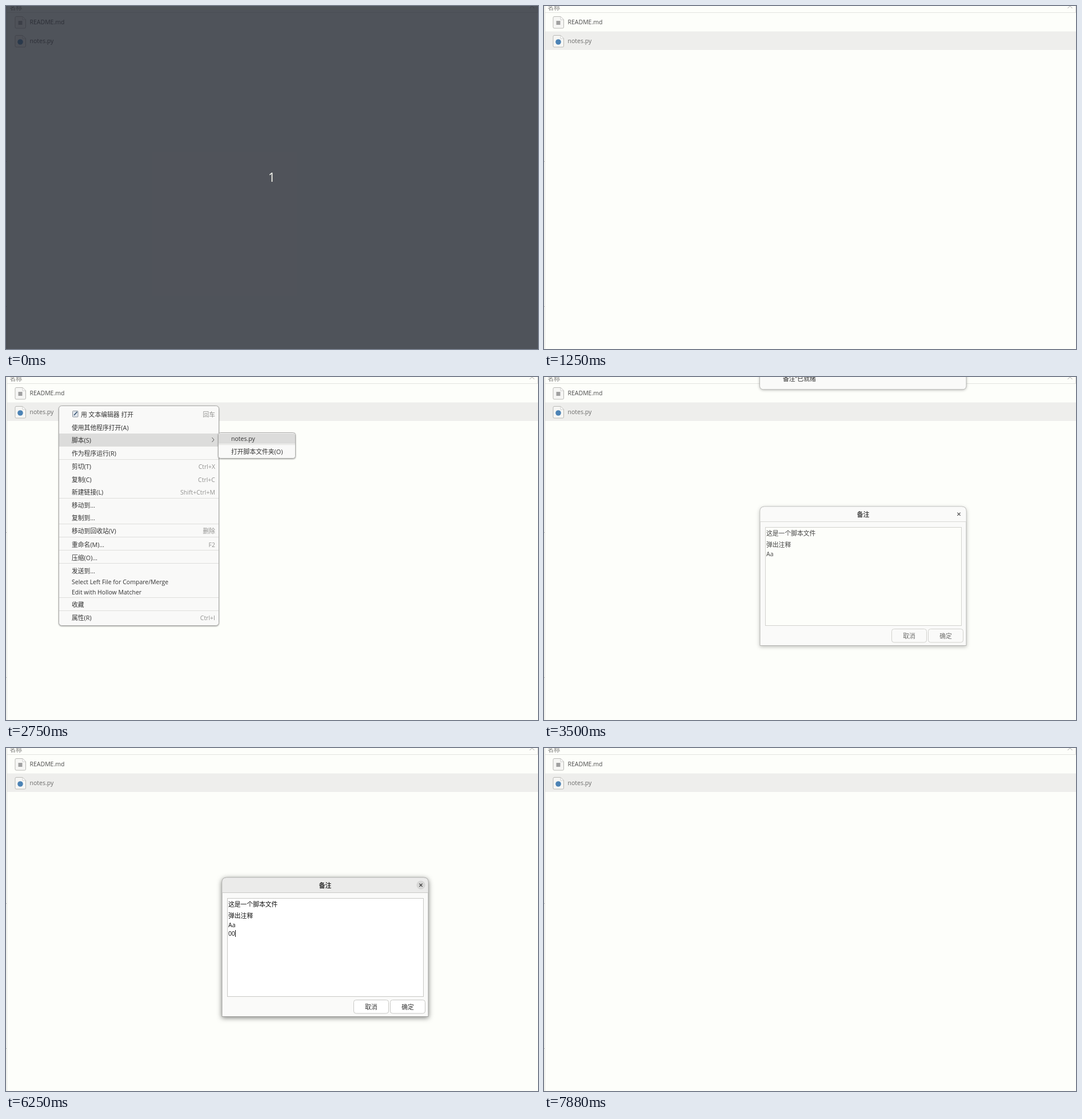
An HTML page that plays this animation: 931x601 px, repeating every 8 s.

```html
<!DOCTYPE html>
<html lang="zh-CN">
<head>
<meta charset="utf-8">
<title>notes</title>
<style>
  html, body { margin: 0; width: 100%; height: 100%; overflow: hidden; background: #fdfefa; }
  svg { display: block; }
  text { font-family: "Open Sans", "Noto Sans CJK SC", "Noto Sans CJK", sans-serif; white-space: pre; }
</style>
</head>
<body>
<script>
const LOOP = 8000;
const NS = 'http://www.w3.org/2000/svg';

function add(parent, tag, attrs = {}) {
  const el = document.createElementNS(NS, tag);
  for (const key in attrs) el.setAttribute(key, attrs[key]);
  parent.appendChild(el);
  return el;
}
const group = (parent, attrs) => add(parent, 'g', attrs);
const rect = (parent, x, y, width, height, fill, more) =>
  add(parent, 'rect', { x, y, width, height, fill, ...more });
const path = (parent, d, stroke, more) =>
  add(parent, 'path', { d, stroke, fill: 'none', ...more });

// Chinese labels are set slightly larger than Latin ones.
function label(parent, str, x, y, fill, more) {
  const size = /[\u4e00-\u9fff]/.test(str) ? 10.8 : 10.5;
  const el = add(parent, 'text', { x, y, fill, 'font-size': size, ...more });
  el.textContent = str;
  return el;
}

// Holds each value until the time of the next one.
function hold(el, prop, table) {
  const frames = table.map(([ms, value]) => ({ offset: ms / LOOP, [prop]: value, easing: 'step-end' }));
  frames.push({ offset: 1, [prop]: table[table.length - 1][1] });
  el.animate(frames, { duration: LOOP, iterations: Infinity });
}
const show = (el, from, to = LOOP) =>
  hold(el, 'opacity', [[0, 0], [from, 1], ...(to < LOOP ? [[to, 0]] : [])]);

const stage = add(document.body, 'svg', { width: 931, height: 601, viewBox: '0 0 931 601' });

function fileIcon(y) {
  path(stage, `M18 ${y}H29L34.5 ${y + 5.5}V${y + 18.5}q0 2 -2 2H18q-2 0 -2 -2V${y + 2}q0 -2 2 -2Z`, '#b9b9b5', { fill: '#f6f6f4' });
  path(stage, `M29 ${y}V${y + 5.5}H34.5Z`, '#c6c6c2', { fill: '#fff', 'stroke-width': .8 });
}

function fileList() {
  rect(stage, 0, 0, 931, 601, '#fdfefa');
  rect(stage, 1, 0, 1, 601, '#dededa');
  rect(stage, 2, 11, 929, 1, '#e3e3df');
  rect(stage, 930, 0, 1, 11, '#dededa');
  for (const y of [272, 526]) rect(stage, 0, y, 1, 1, '#aaa');
  label(stage, '名称', 6.5, 7, '#a3a3a0', { 'font-weight': 700 });
  path(stage, 'M916.5 4L920.5 0L924.5 4', '#a8a8a5');

  const row = rect(stage, 2, 44.5, 929, 32.5, '#eeeeec');
  show(row, 1250);
  fileIcon(18.5);
  rect(stage, 21.5, 26, 7, 7, '#a0a0a0');
  label(stage, 'README.md', 41.5, 32, '#4c4c4c');
  fileIcon(51.5);
  add(stage, 'circle', { cx: 25, cy: 63, r: 4.8, fill: '#4c83b5' });
  const name = label(stage, 'notes.py', 41.5, 65, '#4c4c4c');
  hold(name, 'fill', [[0, '#4c4c4c'], [1250, '#6a6a69']]);
}

function menuBox(parent, x, y, w, h, r) {
  rect(parent, x, y, w, h, '#f9f9f8', {
    rx: r, stroke: '#a9a9a7', style: 'filter:drop-shadow(0 1px 1.2px rgba(0,0,0,.35))'
  });
}

function contextMenu() {
  const menu = group(stage);
  show(menu, 1750, 3130);
  menuBox(menu, 92.5, 50.5, 280, 385, 5);
  const hover = rect(menu, 93, 55, 279, 22, '#dcdcdb');
  show(hover, 1880);
  hold(hover, 'transform', [[0, 'translateY(0px)'], [2000, 'translateY(22px)'], [2130, 'translateY(44px)']]);

  for (const y of [121, 144, 212, 257, 280, 303, 326, 386, 409]) rect(menu, 93, y, 279, 1, '#dededc');
  const items = [
    ['用 文本编辑器 打开', 66, '回车'], ['使用其他程序打开(A)', 88.5], ['脚本(S)', 111],
    ['作为程序运行(R)', 134], ['剪切(T)', 157, 'Ctrl+X'], ['复制(C)', 179.5, 'Ctrl+C'],
    ['新建链接(L)', 202, 'Shift+Ctrl+M'], ['移动到…', 225], ['复制到…', 247],
    ['移动到回收站(V)', 270, '删除'], ['重命名(M)…', 293.5, 'F2'], ['压缩(O)…', 316.5],
    ['发送到…', 339.5], ['Select Left File for Compare/Merge', 359], ['Edit with Hollow Matcher', 377],
    ['收藏', 399], ['属性(R)', 422, 'Ctrl+I']
  ];
  items.forEach(([str, y, key], i) => {
    label(menu, str, i ? 115 : 131, y + 4, '#333');
    if (key) label(menu, key, 366, y + 4, '#929290', { 'text-anchor': 'end' });
  });
  rect(menu, 116.5, 59.5, 9.5, 10.5, '#dfe5ec', { rx: 1, stroke: '#8d949c' });
  path(menu, 'M119 67L124.5 61', '#34506e', { 'stroke-width': 1.7 });
  path(menu, 'M360.5 106L364 110L360.5 114', '#555');

  const sub = group(menu);
  show(sub, 2380);
  menuBox(sub, 371.5, 97.5, 135, 45, 4);
  show(rect(sub, 372, 99, 134, 18, '#dcdcdb'), 2750);
  rect(sub, 372, 118, 134, 1, '#dededc');
  label(sub, 'notes.py', 394, 112, '#333');
  label(sub, '打开脚本文件夹(O)', 394, 134.5, '#333');
}

const FOCUSED = {
  head: '#ebebea', line: '#c9c9c7', title: '#2e2e2e', area: '#fff', text: '#111',
  button: '#fff', caption: '#333', edge: '#a3a3a1', frame: '#c8c8c5',
  shadow: 'drop-shadow(0 2.5px 4.5px rgba(0,0,0,.5))'
};
const BACKDROP = {
  head: '#fafaf9', line: '#d8d8d5', title: '#484848', area: '#fdfefa', text: '#454545',
  button: '#fafaf9', caption: '#6c6c6a', edge: '#b5b5b2', frame: '#d2d2ce',
  shadow: 'drop-shadow(0 2px 3px rgba(0,0,0,.25))'
};

function dialog(look) {
  const box = group(stage);
  const middle = { 'text-anchor': 'middle' };
  path(box, 'M378 470.5V235q0 -8 8 -8H731q8 0 8 8V470.5Z', look.edge,
    { fill: '#fafaf9', style: `filter:${look.shadow}` });
  path(box, 'M378.5 253V235q0 -7.5 7.5 -7.5H731q7.5 0 7.5 7.5V253Z', 'none', { fill: look.head });
  rect(box, 378.5, 253, 360, 1, look.line);
  label(box, '备注', 558.5, 245.3, look.title, { ...middle, 'font-weight': 700 });
  if (look === FOCUSED) add(box, 'circle', { cx: 726, cy: 240.2, r: 7.6, fill: '#d7d7d6' });
  path(box, 'M723.4 237.6l5.2 5.2m0 -5.2l-5.2 5.2', look.title, { 'stroke-width': 1.2 });
  rect(box, 387.5, 263.5, 343, 172, look.area, { stroke: look.frame });
  [['这是一个脚本文件', 278], ['弹出注释', 297.5], ['Aa', 314]]
    .forEach(([str, y]) => label(box, str, 389, y, look.text));
  const buttons = [['取消', 608.5], ['确定', 672.5]].map(([str, x]) => {
    const face = rect(box, x, 441.5, 61, 23.5, look.button, { rx: 4, stroke: look.frame });
    label(box, str, x + 30.5, 457.5, look.caption, middle);
    return face;
  });
  return { box, ok: buttons[1] };
}

function dialogs() {
  const typed = [6000, 6250, 6380];
  const advance = 5.8;
  const typeZeros = (box, fill) => typed.forEach((ms, i) =>
    show(label(box, '0', 389 + i * advance, 329, fill), ms));

  const idle = dialog(BACKDROP);
  typeZeros(idle.box, BACKDROP.text);
  idle.box.style.transformOrigin = '558.5px 348.5px';
  hold(idle.box, 'opacity', [[0, 0], [3250, .5], [3500, 1], [4380, 0], [7630, 1], [7880, 0]]);
  hold(idle.box, 'transform', [[0, 'scaleY(.5)'], [3500, 'scaleY(1)']]);

  const active = dialog(FOCUSED);
  typeZeros(active.box, FOCUSED.text);
  hold(active.box, 'opacity', [[0, 0], [4250, .5], [4380, 1], [7630, 0]]);
  hold(active.ok, 'fill', [[0, '#fff'], [7380, '#f6f6f5'], [7500, '#d9d9d7']]);

  const caret = rect(active.box, 389, 319, 1, 12, '#111');
  hold(caret, 'opacity', [[0, 0], [4250, 1], [4630, 0], [5000, 1], [5880, 0], [6000, 1]]);
  hold(caret, 'transform', [[0, 'translateX(0px)'],
    ...typed.map((ms, i) => [ms, `translateX(${Math.round((i + 1) * advance)}px)`])]);
}

function notification() {
  const note = group(stage);
  rect(note, 377.5, -40, 361.5, 61.8, '#fafaf9', {
    rx: 6, stroke: '#b9b9b6', style: 'filter:drop-shadow(0 1px 2px rgba(0,0,0,.25))'
  });
  label(note, '备注”已就绪', 418, 6.5, '#2a2a2a');
  hold(note, 'opacity', [[0, 0], [3500, 1], [4250, .6], [4380, 0]]);
  hold(note, 'transform', [[0, 'translateY(0px)'], [4250, 'translateY(-10px)']]);
}

function countdown() {
  const cover = group(stage);
  rect(cover, 0, 0, 931, 601, 'rgba(34,38,47,.79)');
  label(cover, '1', 465, 308, '#fffff4', { 'text-anchor': 'middle', style: 'font-size:21px' });
  hold(cover, 'opacity', [[0, 1], [130, 0]]);
}

fileList();
contextMenu();
dialogs();
notification();
countdown();
</script>
</body>
</html>
```
